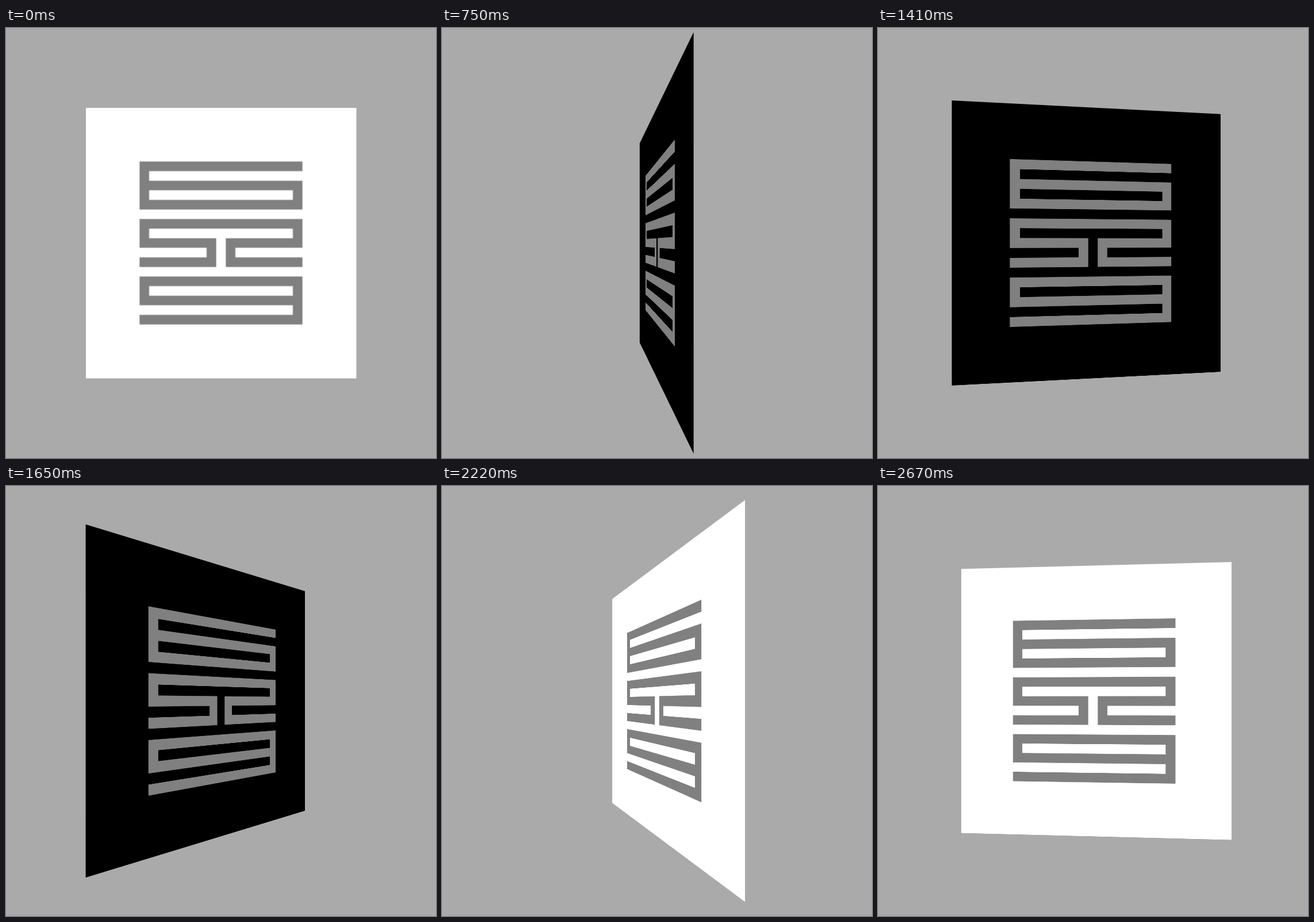
An HTML page without scripts for the animation above (2.7 s loop, 748 px wide and 748 px high).

```html
<!DOCTYPE html>
<html lang="en">
<head>
<meta charset="utf-8">
<title>Turning card</title>
<style>
  html, body {
    margin: 0;
    width: 100%;
    height: 100%;
    overflow: hidden;
    background: #aaa;
  }
  .stage {
    position: relative;
    width: 748px;
    height: 748px;
    overflow: hidden;
    perspective: 647.8px; /* 60 degree field of view */
  }
  .card {
    position: absolute;
    inset: 0;
    transform-style: preserve-3d;
    animation: turn 2700ms steps(90) -1ms infinite;
  }
  /* Faces are laid out at double size and halved, so they stay sharp up close. */
  .face {
    position: absolute;
    left: -97px;
    top: -97px;
    width: 942px;
    height: 942px;
    backface-visibility: hidden;
  }
  .front { background: #fff; transform: scale(.5); }
  .back { background: #000; transform: rotateY(180deg) scale(.5); }
  svg { display: block; width: 100%; height: 100%; }
  path { fill: none; stroke: #808080; stroke-width: 1; }
  @keyframes turn {
    from { transform: rotateY(0deg); }
    to { transform: rotateY(360deg); }
  }
</style>
</head>
<body>
<div class="stage">
  <div class="card">
    <div class="face front">
      <svg viewBox="-5.63 -5.63 28.26 28.26">
        <path id="sign" d="M17 .5H.5V4.5H16.5V2.5H.5
          M0 10.5H7.5V8.5H.5V6.5H16.5V8.5H9.5V10.5H17
          M0 16.5H16.5V12.5H.5V14.5H16.5"/>
      </svg>
    </div>
    <div class="face back">
      <svg viewBox="-5.63 -5.63 28.26 28.26"><use href="#sign"/></svg>
    </div>
  </div>
</div>
</body>
</html>
```
